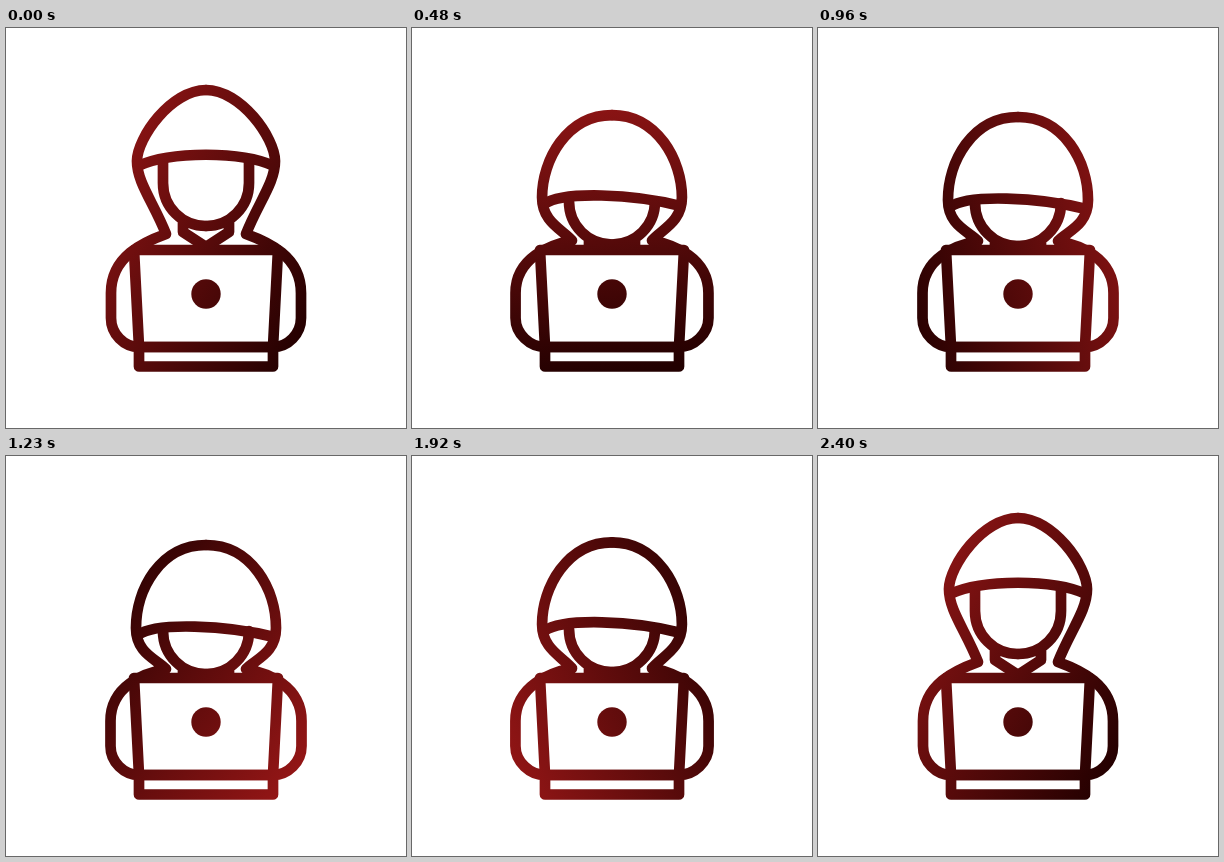
An HTML page with a canvas that plays this animation: 400 px wide and 400 px high, repeating every 5350 ms.

```html
<!DOCTYPE html>
<html lang="en">
<head>
<meta charset="utf-8">
<title>Hooded figure</title>
<style>
html, body { margin: 0; height: 100%; overflow: hidden; background: #fff; }
canvas { display: block; width: 100vw; height: 100vh; }
</style>
</head>
<body>
<canvas width="400" height="400"></canvas>
<script>
const ctx = document.querySelector('canvas').getContext('2d');
const LOOP = 5350, MOVE = 2400, STEP = 30;

const laptop = new Path2D('M133 319L128 222H272L267 319Z');
const base = new Path2D('M133 319H267V338.5H133Z');

const lerp = (a, b, p) => a + (b - a) * p;
const ease = (t, from, to) => {
  const u = Math.min(1, Math.max(0, (t - from) / (to - from)));
  return (1 - Math.cos(Math.PI * u)) / 2;
};

// 0 = upright, 1 = ducked behind the laptop, below 0 = overshoot
const duck = t => ease(t, 0, 580) - 1.15 * ease(t, 1850, 2220) + 0.15 * ease(t, 2220, MOVE);

// Left half of the figure
function halfBody(p) {
  const y = (a, b) => lerp(a, b, p);
  const arm = 105 - 0.5 * p - 4 * p * Math.sqrt(Math.max(0, 1 - p));
  const side = y(131, 130), hem = y(206, 213), top = y(62, 89);
  const chin = y(198, 218), jaw = y(155, 175);
  return new Path2D(`
    M200 ${top} C${y(165, 154)} ${top} ${side} ${y(110, 134)} ${side} ${y(133, 172)}
    C${side} ${y(155, 197)} ${y(148, 150)} ${y(175, 203)} 160 ${hem}
    C138 ${y(214, 217)} ${arm} ${y(228, 230)} ${arm} 265
    V290 C${arm} 306 118 319 133 319
    M157 ${y(133, 178)} V${jaw} C157 ${jaw + 24} 176 ${chin} 200 ${chin}
    M177 ${chin - 6} V${chin + 6} L200 ${chin + 21}`);
}

function brow(p) {
  const y = (a, b) => lerp(a, b, p);
  return new Path2D(`M${y(132, 132)} ${y(138, 179)}
    C${y(165, 150)} ${y(123, 166)} ${y(235, 220)} ${y(123, 169)} 268 ${y(138, 181)}`);
}

// The light turns once around the figure
function shade(t) {
  const turn = (t / MOVE + ease(t, 0, MOVE)) / 2;
  const a = (-60 + 360 * turn) * Math.PI / 180;
  const dx = 145 * Math.sin(a), dy = -145 * Math.cos(a);
  const g = ctx.createLinearGradient(200 - dx, 200 - dy, 200 + dx, 200 + dy);
  g.addColorStop(0, '#220000');
  g.addColorStop(1, '#941616');
  return g;
}

function fillAll(mode, style) {
  ctx.globalCompositeOperation = mode;
  ctx.fillStyle = style;
  ctx.fillRect(0, 0, 400, 400);
}

function draw(t) {
  const p = duck(t), half = halfBody(p);
  ctx.globalCompositeOperation = 'source-over';
  ctx.clearRect(0, 0, 400, 400);
  ctx.lineWidth = 10.7;
  ctx.lineCap = ctx.lineJoin = 'round';

  ctx.stroke(half);
  ctx.save();
  ctx.transform(-1, 0, 0, 1, 400, 0);
  ctx.stroke(half);
  ctx.restore();
  ctx.stroke(brow(p));

  // The laptop hides what is behind it
  ctx.globalCompositeOperation = 'destination-out';
  ctx.fillStyle = '#000';
  ctx.fill(laptop);
  ctx.globalCompositeOperation = 'source-over';
  ctx.stroke(laptop);
  ctx.stroke(base);
  ctx.beginPath();
  ctx.arc(200, 266, 14.7, 0, 2 * Math.PI);
  ctx.fill();

  fillAll('source-in', shade(t));
  fillAll('destination-over', '#fff');
}

const start = performance.now();
function tick() {
  const t = (performance.now() - start) % LOOP;
  draw(Math.min(MOVE, Math.floor(t / STEP) * STEP));
  requestAnimationFrame(tick);
}
tick();
</script>
</body>
</html>
```
